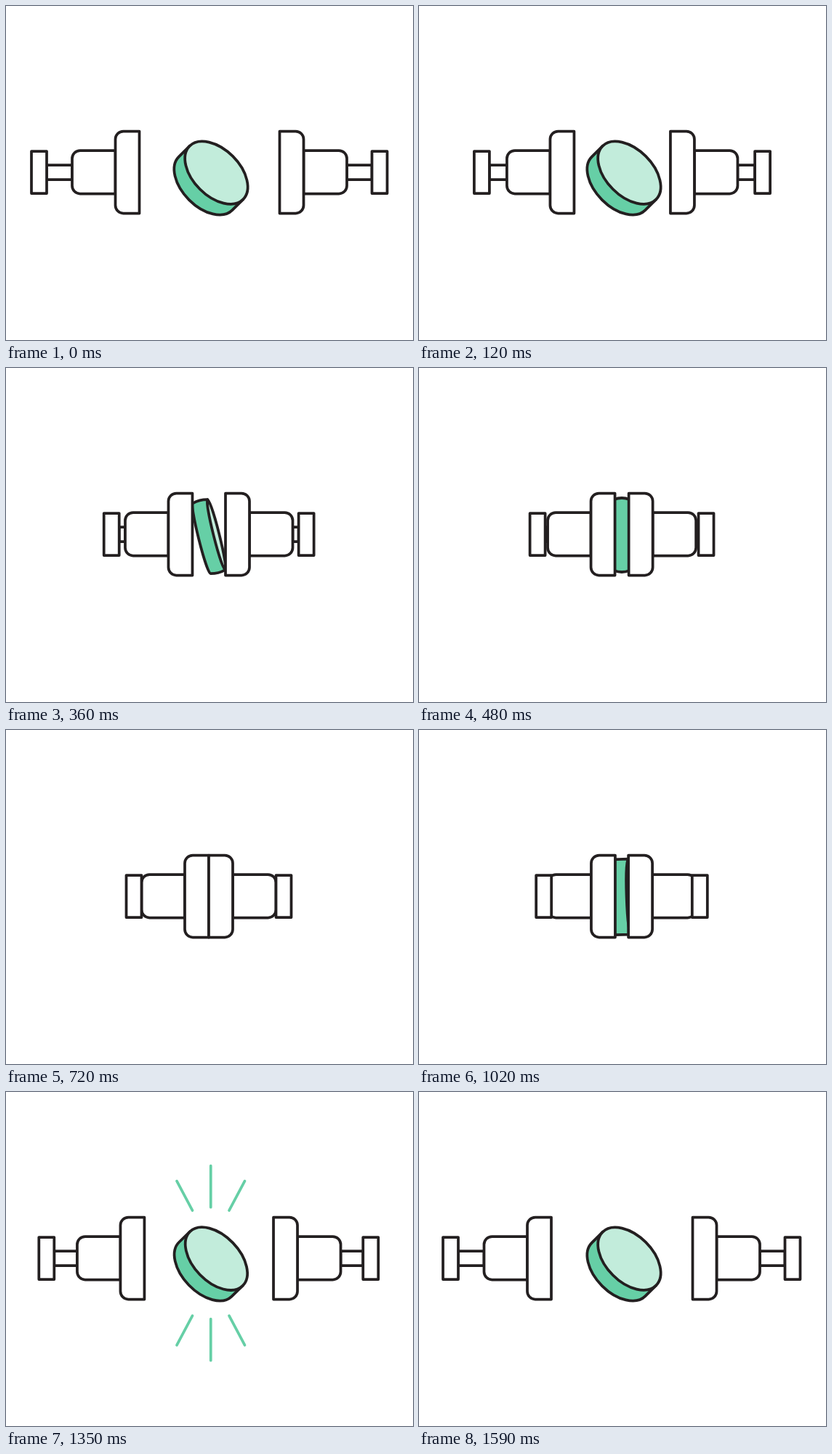
These frames come from a looping animation (560 px wide and 460 px high, 1740 ms). An HTML page with a canvas:

```html
<!DOCTYPE html>
<html lang="en">
<head>
<meta charset="utf-8">
<title>Press</title>
<style>
html, body { margin: 0; width: 100%; height: 100%; overflow: hidden; background: #fff; }
canvas { display: block; }
</style>
</head>
<body>
<canvas id="stage" width="560" height="460"></canvas>
<script>
const ctx = document.getElementById('stage').getContext('2d');
const LOOP = 1740, STEP = 30;
const INK = '#231f20', GREEN = '#66cfa6', MINT = '#c2ecdb';

const clamp = v => Math.min(1, Math.max(0, v));
const easeOut = u => 1 - (1 - clamp(u)) ** 2;
const smooth = u => { u = clamp(u); return u * u * (3 - 2 * u); };

function paint(fill) {
  ctx.fillStyle = fill;
  ctx.fill();
  ctx.stroke();
}

function box(x, y, w, h, r = 0) {
  ctx.beginPath();
  ctx.roundRect(x, y, w, h, [0, r, r, 0]);
  paint('#fff');
}

// side: 1 = right, -1 = left; head and plate are distances from the closed pose
function jaw(side, head, plate) {
  ctx.save();
  ctx.translate(279, 0);
  ctx.scale(side, 1);
  box(head + 92.5, 219, plate - head, 20);
  box(head + 33, 199, 59.5, 59.5, 11);
  box(head, 172.5, 33, 113, 11);
  box(plate + 92.5, 200, 21, 58);
  ctx.restore();
}

// A drum: s = 0 edge-on, s = 1 fully turned to the viewer
function disc(s, y, minor, squash) {
  const h = 10.5, R = 52 - 3 * squash, bulge = R + 4 * squash;
  ctx.save();
  ctx.translate(279 + 3 * s * s, y);
  ctx.rotate(-s * Math.PI / 4);
  ctx.beginPath();
  ctx.ellipse(-h, 0, minor, R, 0, Math.PI / 2, Math.PI * 1.5);
  ctx.quadraticCurveTo(0, -bulge, h, -R);
  ctx.lineTo(h, R);
  ctx.quadraticCurveTo(0, bulge, -h, R);
  ctx.closePath();
  paint(GREEN);
  ctx.beginPath();
  ctx.ellipse(h, 0, minor, R, 0, 0, Math.PI * 2);
  paint(MINT);
  ctx.restore();
}

function rays(y, grow) {
  ctx.save();
  ctx.translate(281.75, y);
  ctx.strokeStyle = GREEN;
  ctx.beginPath();
  for (const v of [-1, 1]) {
    for (const d of [-1, 0, 1]) {
      const inner = d ? 72.5 : 77, length = d ? 40.5 : 57;
      ctx.moveTo(d * 25.25, v * inner);
      ctx.lineTo(d * (25.25 + 21.5 * grow), v * (inner + length * grow));
    }
  }
  ctx.stroke();
  ctx.restore();
}

function draw(t) {
  const closing = t < 900;
  const head = closing ? 1 - easeOut(t / 700) : easeOut((t - 996) / 502);
  const plate = closing ? 1 - easeOut(t / 700) : easeOut((t - 1012) / 486);

  ctx.clearRect(0, 0, 560, 460);
  ctx.lineWidth = 3.75;
  ctx.lineJoin = ctx.lineCap = 'round';
  ctx.strokeStyle = INK;

  if (closing && t < 720) {
    // The jaws squeeze the drum flat once they touch it
    const s = clamp((head * 195 - 20) / 83);
    disc(s, 230 + 7 * s, 32 * s ** 1.8, 1 - s);
  } else if (t > 990) {
    const s = smooth((t - 967) / 420);
    const u = clamp((t - 990) / 350);
    const y = 230 + 7 * s - 58 * u * u * (1 - u);
    disc(s, y, 32 * s ** 0.67, 0);
    if (t > 1100 && t < 1590) rays(y - 1.25 * s + 2 * (1 - s), clamp((t - 1100) / 130));
  }

  jaw(-1, head * (closing ? 95.5 : 97), plate * (closing ? 130.5 : 132.5));
  jaw(1, head * 97.5, plate * 132);
}

const start = performance.now();
function tick() {
  const t = (performance.now() - start) % LOOP;
  draw(Math.floor(t / STEP) * STEP);
  requestAnimationFrame(tick);
}
tick();
</script>
</body>
</html>
```
